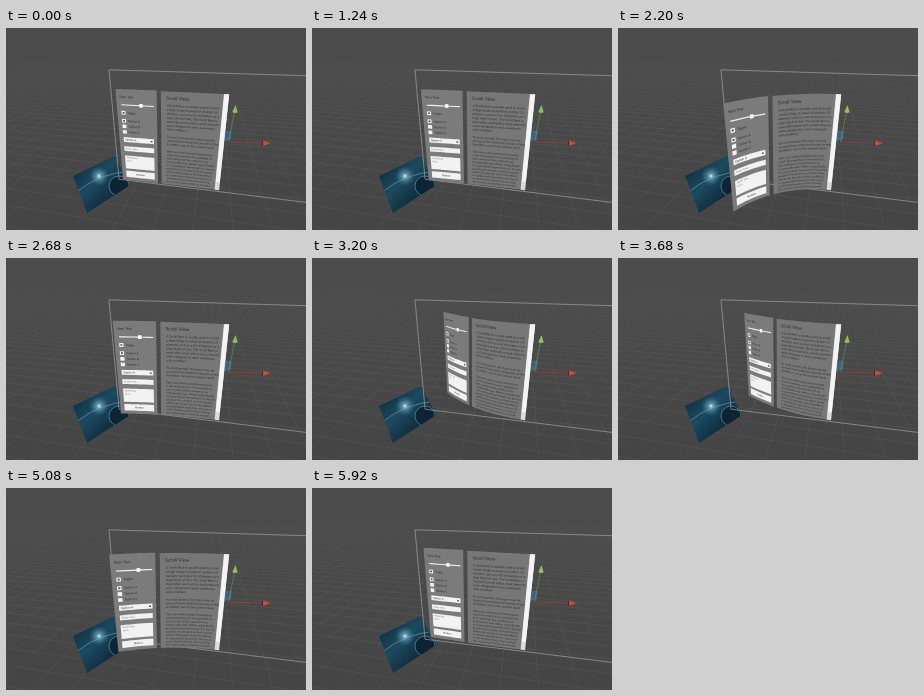
An HTML page for the animation above (6480 ms loop, 300 px wide and 202 px high).

```html
<!DOCTYPE html>
<html lang="en">
<head>
<meta charset="utf-8">
<title>Curved panels</title>
<style>
html, body { margin: 0; width: 100%; height: 100%; overflow: hidden; background: #484848; }
svg { display: block; width: 100%; height: 100%; }
text { font-family: Lato, "Open Sans", sans-serif; text-rendering: geometricPrecision; }
</style>
</head>
<body>
<svg id="stage" viewBox="0 0 300 202">
  <defs>
    <linearGradient id="ground" x2="0" y2="1">
      <stop stop-color="#4c4c4c"/><stop offset="1" stop-color="#454545"/>
    </linearGradient>
    <linearGradient id="fade" x2="0" y2="1">
      <stop offset=".08" stop-color="#fff" stop-opacity="0"/><stop offset=".5" stop-color="#fff"/>
    </linearGradient>
    <mask id="haze"><rect width="300" height="202" fill="url(#fade)"/></mask>
    <linearGradient id="space" x2="1" y2="1">
      <stop offset=".1" stop-color="#0b2332"/><stop offset=".45" stop-color="#1c4a60"/>
      <stop offset=".8" stop-color="#0a1d2b"/>
    </linearGradient>
    <radialGradient id="glow">
      <stop stop-color="#e6f6fb"/><stop offset=".25" stop-color="#7fb4c8" stop-opacity=".7"/>
      <stop offset="1" stop-color="#3c7f9c" stop-opacity="0"/>
    </radialGradient>
    <clipPath id="photo"><path d="M67 148L109 128L124 157L81 185Z"/></clipPath>
  </defs>
  <rect width="300" height="202" fill="url(#ground)"/>
  <path id="grid" fill="none" stroke="#626262" stroke-width=".6" opacity=".55" mask="url(#haze)"/>
  <g clip-path="url(#photo)">
    <rect x="60" y="120" width="70" height="70" fill="url(#space)"/>
    <path d="M72 163Q92 146 124 143" fill="none" stroke="#6fa5ba" stroke-width=".9" opacity=".7"/>
    <circle cx="93" cy="148" r="10" fill="url(#glow)"/>
    <circle cx="113" cy="158" r="10" fill="#0c2434" stroke="#5d93aa" stroke-width=".7"/>
  </g>
  <path id="frame" fill="none" stroke="#a2a2a2" stroke-width=".7"/>
  <g id="panels"></g>
  <g fill="none" stroke-width=".8">
    <path d="M219.500 104L225 103L224.500 111L219 112Z" fill="#3577b0" fill-opacity=".5" stroke="#4b7fa8" stroke-width=".6"/>
    <path d="M222.500 114L228.500 84" stroke="#6f9a4c" opacity=".75"/>
    <path d="M222.500 114L256 115" stroke="#9a4234"/>
    <path d="M229.500 77L226.300 84Q229 86 231.700 84.300Z" fill="#8fbf5a"/>
    <path d="M264.500 115.300L257.500 112.500Q256 115 257.500 117.800Z" fill="#d14a36"/>
    <path d="M256.500 112.800V117.500" stroke="#3a2422"/>
  </g>
</svg>
<script>
const SVG = "http://www.w3.org/2000/svg";
const panels = document.getElementById("panels");
const CENTER = [160, 101], FOCAL = 229, PITCH = 0.389, YAW = -0.202;
const PIVOT = [62, 10.1, FOCAL];
const [sp, cp, sy, cy] = [Math.sin(PITCH), Math.cos(PITCH), Math.sin(YAW), Math.cos(YAW)];
const updaters = [];

// Canvas point (u, v), rolled on a cylinder of the given curvature, to the screen.
function project(u, v, bend) {
  const k = bend || 1e-6;
  const a = Math.sin(k * u) / k, w = (1 - Math.cos(k * u)) / k;
  const x = PIVOT[0] + a * cy + w * sy;
  const y = PIVOT[1] - a * sy * sp - v * cp + w * cy * sp;
  const z = PIVOT[2] + a * sy * cp - v * sp - w * cy * cp;
  return [CENTER[0] + FOCAL * x / z, CENTER[1] + FOCAL * y / z];
}

const toPath = points => "M" + points.map(p => p.map(n => n.toFixed(2)).join(" ")).join("L");

function add(tag, attrs) {
  const el = document.createElementNS(SVG, tag);
  for (const name in attrs) el.setAttribute(name, attrs[name]);
  return panels.appendChild(el);
}

function patch(u0, u1, top, bottom, fill) {
  const el = add("path", { fill });
  const steps = Math.max(1, Math.ceil((u1 - u0) / 5));
  updaters.push(bend => {
    const upper = [], lower = [];
    for (let i = 0; i <= steps; i++) {
      const u = u0 + (u1 - u0) * i / steps;
      upper.push(project(u, top, bend));
      lower.unshift(project(u, bottom, bend));
    }
    el.setAttribute("d", toPath(upper.concat(lower)) + "Z");
  });
}

const ruler = document.createElement("canvas").getContext("2d");
ruler.font = '100px Lato, "Open Sans", sans-serif';
const measure = (s, size) => ruler.measureText(s).width * size / 100;

// Each word follows the local slope of the surface.
function label(string, u, v, size, fill = "#2b2b2b") {
  for (const word of string.split(" ")) {
    const el = add("text", { fill, "font-size": size });
    el.textContent = word;
    const width = measure(word, size), left = u, mid = u + width / 2;
    updaters.push(bend => {
      const [x, y] = project(mid, v, bend);
      const [x0, y0] = project(left, v, bend);
      const [x1, y1] = project(left + width, v, bend);
      const [xd, yd] = project(mid, v - 1, bend);
      const m = [(x1 - x0) / width, (y1 - y0) / width, xd - x, yd - y, x0, y0];
      el.setAttribute("transform", `matrix(${m.map(n => n.toFixed(4))})`);
    });
    u += width + measure(" ", size);
  }
}

function toggle(name, v, checked) {
  patch(-110.5, -106.2, v + 2.1, v - 2.1, "#f2f2f2");
  if (checked) patch(-109.3, -107.4, v + 0.9, v - 0.9, "#4a4a4a");
  label(name, -104, v - 1.1, 3.2);
}

const field = (top, bottom) => patch(-110.3, -76.3, top, bottom, "#f2f2f2");

function controls() {
  patch(-115, -72.5, 46, -62.5, "#7b7b7b");
  label("New Text", -111.5, 36.9, 3.6);
  patch(-110, -75.6, 30.2, 29, "#f0f0f0");
  patch(-90.8, -87.3, 31.5, 27.7, "#ffffff");
  toggle("Toggle", 21, true);
  toggle("Option A", 12.1, true);
  toggle("Option B", 5.8, false);
  toggle("Option C", -0.6, false);
  field(-6.9, -12.7);
  label("Option A", -108.5, -10.9, 3.1);
  patch(-80, -78, -9.2, -10.7, "#444444");
  field(-17.9, -23.9);
  label("Enter text...", -108.5, -21.9, 3, "#777777");
  field(-29.6, -46.6);
  label("Multi line", -108.5, -33.3, 3, "#777777");
  label("text...", -108.5, -37.3, 3, "#777777");
  field(-49.6, -58.3);
  label("Button", -98, -55, 3.3);
}

const article = `A Scroll Rect is usually used to scroll
a large image or panel of another UI
element, such as a list of buttons or a
large block of text. The Scroll Rect is
most often used with a mask element,
and is designed to work seamlessly
with scrollbars.

To scroll content, the input must be
received from inside the bounds of the
ScrollRect, not on the content itself.

Take care when using Unrestricted
scroll movement as it is possible to
lose control of the content in an
irretrievable way. When using Elastic
or Constrained movement it is best to
position the content so that it starts
within the bounds of the ScrollRect,
or undesirable behaviour may occur
as the RectTransform tries to bring
the content back within its bounds.`;

function scrollView() {
  patch(-68.3, -3.4, 45.5, -62.5, "#777777");
  label("Scroll View", -63, 37.2, 4.7);
  article.split("\n").forEach((line, row) => {
    if (line) label(line, -62.5, 30.2 - row * 4.28, 3.2);
  });
  patch(-8.2, -3.4, 45.5, -62.5, "#dcdcdc");
  patch(-7.8, -3.6, 45, -52, "#f4f4f4");
}

function scenery() {
  const [leftX, rightX, horizon] = [-1046, 211, 7];
  const lines = [];
  for (let n = 0; n < 60; n++) {
    const slope = 1750 / (6 + n) / (150 - leftX);
    lines.push([0, 300].map(x => [x, horizon + slope * (x - leftX)]));
  }
  for (let n = -34; n <= 34; n++) lines.push([[rightX, horizon], [rightX + (n + 0.4) * 42, 210]]);
  document.getElementById("grid").setAttribute("d", lines.map(toPath).join(""));
  const corners = [[-121, 64.4], [121, 64.4], [121, -64.4], [-121, -64.4]];
  document.getElementById("frame").setAttribute("d",
    toPath(corners.map(([u, v]) => project(u, v, 0))) + "Z");
}

const LOOP = 6480, REST = 0.0003;
const easeOut = x => 1 - (1 - x) ** 2;
const easeBoth = x => x * x * (3 - 2 * x);
// first change, last change, steps, curvature reached, easing
const moves = [
  [1240, 1280, 2, 0.0008, easeBoth],
  [1440, 2000, 8, 0.0091, easeBoth],
  [2200, 2800, 8, 0.0001, easeBoth],
  [2880, 3520, 9, -0.0078, easeOut],
  [3600, 4200, 8, 0.0045, easeOut],
  [4280, 4720, 6, 0.0091, easeBoth],
  [4920, 5560, 9, -0.0003, easeOut],
  [5640, 5640, 1, -0.0004, easeOut],
  [5920, 5920, 1, -0.0005, easeOut]
];

function bendAt(t) {
  let bend = REST;
  for (const [start, end, steps, goal, ease] of moves) {
    if (t < start) break;
    const step = steps > 1 ? Math.floor((t - start) / (end - start) * (steps - 1) + 1e-6) : 0;
    bend += (goal - bend) * ease(Math.min(1, (step + 1) / steps));
  }
  return bend;
}

scenery();
controls();
scrollView();

let shown = null;
function render(t) {
  const bend = bendAt(t % LOOP);
  if (bend !== shown) updaters.forEach(update => update(bend));
  shown = bend;
}

const began = performance.now();
function tick() {
  render(performance.now() - began);
  requestAnimationFrame(tick);
}
render(0);
requestAnimationFrame(tick);
</script>
</body>
</html>
```
